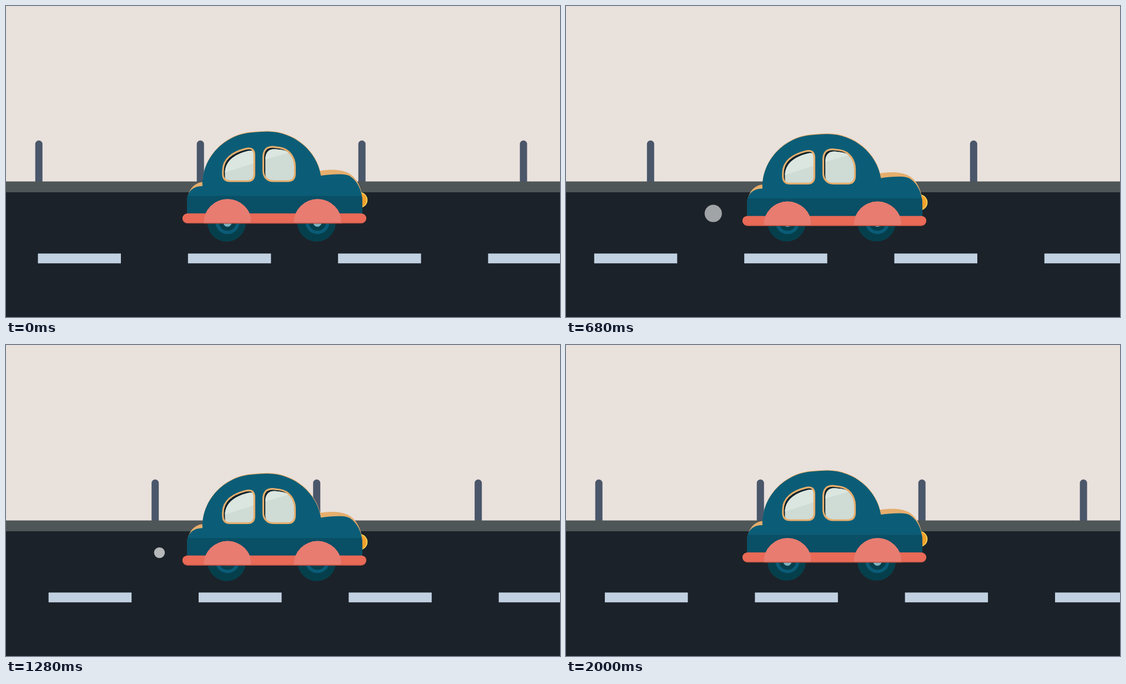
These frames come from a looping animation (998 by 561 pixels, 2040 ms). An HTML page with a canvas:

```html
<!DOCTYPE html>
<html lang="en">
<head>
<meta charset="utf-8">
<title>Little car</title>
<style>
html, body { margin: 0; width: 100%; height: 100%; overflow: hidden; background: #e9e1dc; }
canvas { display: block; width: 998px; height: 561px; }
</style>
</head>
<body>
<canvas id="stage" width="998" height="561"></canvas>
<script>
const ctx = document.getElementById('stage').getContext('2d');
const W = 998, H = 561, LOOP = 2040, STEP = 40;
const TAU = Math.PI * 2;

const body = new Path2D('M326 380V349C328 333 338 325 354 324.8C352 276 392 231 445 228Q458 227 470 226.6C518 226 560 261 567.3 306C583 304 602 302 615 305C630 310 642 331 642 353V380Z');
const dome = new Path2D('M354 324.8C352 276 392 231 445 228Q458 227 470 226.6C518 226 560 261 567.3 306Z');
const trunk = new Path2D('M326 352C328 330 340 319 354 317.5V352Z');
const hood = new Path2D('M566 297.3C584 294.5 604 294.5 618 302C632 310 641 328 642 350H566Z');
const panes = [
  { shape: new Path2D('M390.8 297C391 276 408 263.5 432 257.6Q447.4 254 447.4 269V303Q447.4 316 435 316H404Q390.8 316 390.8 303Z'),
    gloss: new Path2D('M385 303.5L455 281V245H385Z') },
  { shape: new Path2D('M463.5 272Q464 253.5 481 254.2L493 255.6C510 258 520.5 273 520.5 290V302Q520.5 316 507 316H482C470 316 463.5 308 463.5 297Z'),
    gloss: new Path2D('M460 279L525 260V245H460Z') }
];

// Frames at which the body is alternately at its top and its bottom
const bobKeys = [0, 6, 12, 19, 27, 32, 38, 44, 50];
const puffStarts = [0, 9, 18, 27, 37];

function bob(f) {
  let i = 0;
  while (i < bobKeys.length - 2 && f >= bobKeys[i + 1]) i++;
  const k = (f - bobKeys[i]) / (bobKeys[i + 1] - bobKeys[i]);
  const ease = (1 - Math.cos(Math.PI * k)) / 2;
  return 5.4 * (i % 2 ? 1 - ease : ease);
}

function fill(color, path) {
  ctx.fillStyle = color;
  ctx.fill(path);
}

function rect(color, x, y, w, h) {
  ctx.fillStyle = color;
  ctx.fillRect(x, y, w, h);
}

function disc(color, x, y, r) {
  ctx.fillStyle = color;
  ctx.beginPath();
  ctx.arc(x, y, r, 0, TAU);
  ctx.fill();
}

function repeat(x, period, draw) {
  for (x = ((x % period) + period) % period - period; x < W + period; x += period) draw(x);
}

function clipped(path, draw) {
  ctx.save();
  ctx.clip(path);
  draw();
  ctx.restore();
}

function scene(f) {
  rect('#e9e1dc', 0, 0, W, H);
  repeat(59.2 - 11.64 * f, 291, x => {
    ctx.fillStyle = '#4a566a';
    ctx.beginPath();
    ctx.roundRect(x - 6.5, 242.5, 13, 80, 6.5);
    ctx.fill();
  });
  rect('#4e5657', 0, 316.5, W, 20);
  rect('#1c2229', 0, 336, W, H - 336);
  repeat(57.5 - 16.296 * Math.min(f, 49), 270.33, x => rect('#c1d1e1', x, 446.5, 149.5, 17.7));
}

function puff(f) {
  for (const start of puffStarts) {
    const age = f - start;
    if (age <= 0 || age > 9) continue;
    const r = 1.945 * age;
    const alpha = age <= 6 ? 0.136 * age : 0.81 - 0.11 * (age - 6);
    disc(`rgba(255,255,255,${alpha})`, 295 - 1.91 * r, 375.4 - 0.08 * r, r);
  }
}

function wheel(x, f) {
  const a = (190 + 43.2 * f) * TAU / 360;
  disc('#063f4c', x - 0.6 + Math.cos(a), 390.6 + Math.sin(a), 34.6);
  disc('#0a5b77', x, 390, 21.5);
  disc('#063f4c', x, 390, 15.5);
  disc('#7fb0bd', x, 390.8, 7.4);
}

function glass({ shape, gloss }) {
  clipped(shape, () => {
    fill('#0d222b', shape);
    ctx.translate(3.6, 4);
    clipped(shape, () => {
      ctx.translate(-3.6, -4);
      rect('#cfdbd5', 380, 240, 150, 90);
      fill('#dbe6e0', gloss);
    });
  });
  ctx.strokeStyle = '#e6ae6d';
  ctx.lineWidth = 3.2;
  ctx.stroke(shape);
}

function fender(x) {
  const arch = new Path2D();
  arch.arc(x, 391.5, 43.3, Math.PI, 0);
  arch.closePath();
  clipped(arch, () => {
    fill('#c05a4d', arch);
    disc('#e87c70', x - 1.8, 391.5, 43.3);
    disc('#e87c70', x, 386, 42.5);
  });
}

function bumper() {
  const bar = new Path2D();
  bar.roundRect(317.7, 374.3, 331.5, 18.2, 9);
  clipped(bar, () => {
    fill('#bd5446', bar);
    ctx.fillStyle = '#e86a57';
    ctx.beginPath();
    ctx.roundRect(317.7, 372.8, 331.5, 18.2, 9);
    ctx.fill();
  });
}

function car(f) {
  wheel(399, f);
  wheel(561, f);
  ctx.save();
  ctx.translate(0, bob(f));
  disc('#ffd355', 637, 350, 14.3);
  disc('#f4a02c', 636.4, 350, 13);
  fill('#e6ae6d', trunk);
  fill('#e6ae6d', hood);
  ctx.translate(0.3, -1.2);
  fill('#e6ae6d', dome);
  ctx.translate(-0.3, 1.2);
  fill('#0b5d77', body);
  clipped(body, () => rect('#094f65', 320, 342.6, 330, 40));
  panes.forEach(glass);
  bumper();
  fender(399.3);
  fender(561.5);
  rect('#bd5446', 356, 391, 249.5, 1.5);
  ctx.restore();
}

function draw(now) {
  const f = Math.floor((now % LOOP) / STEP);
  scene(f);
  puff(f);
  car(f);
}

const begin = performance.now();
function tick() {
  draw(performance.now() - begin);
  requestAnimationFrame(tick);
}
tick();
</script>
</body>
</html>
```
